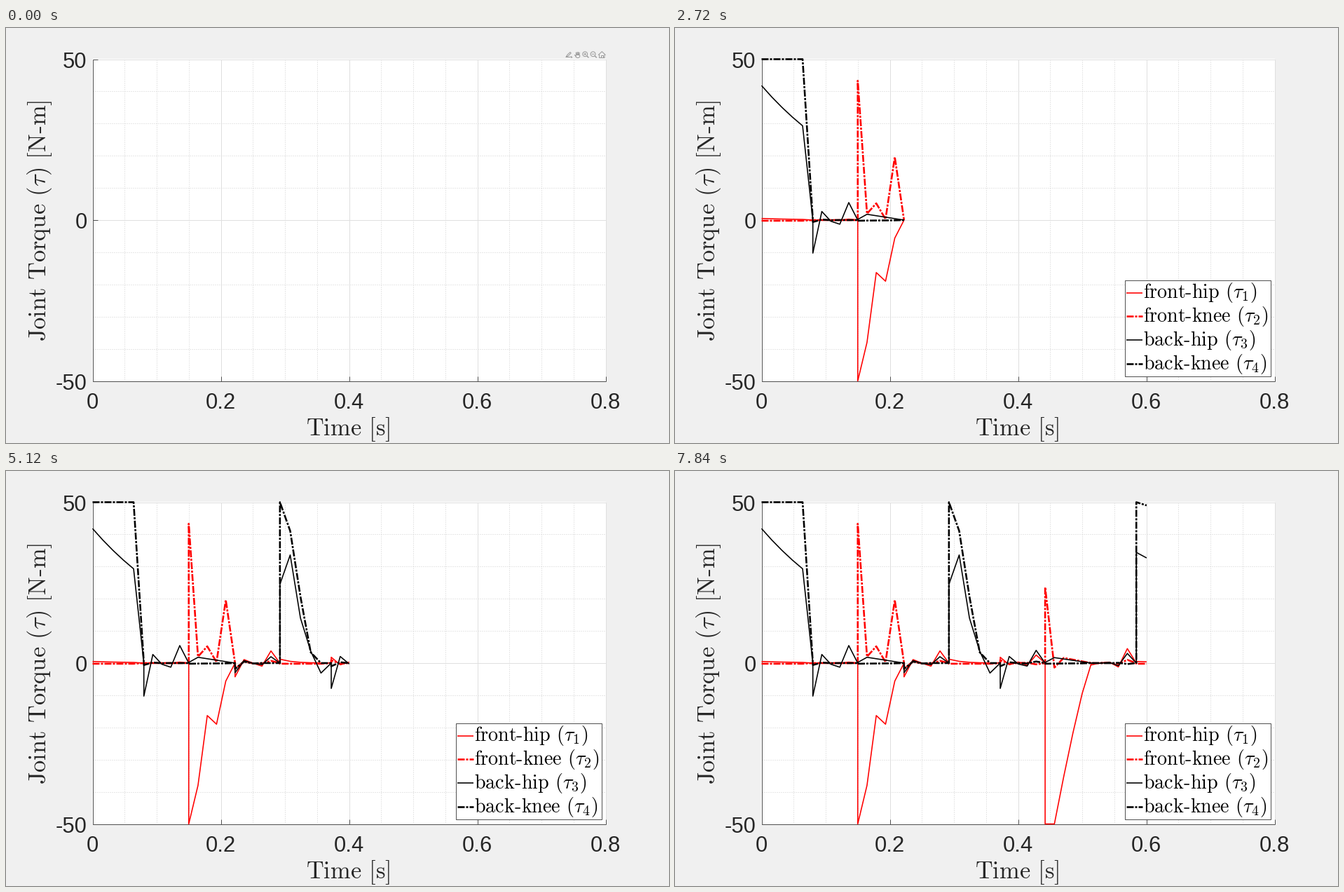
Animation of 946x592 px, one loop 8 s. Source, as a matplotlib script:

```python
import numpy as np
import matplotlib.pyplot as plt
from matplotlib.animation import FuncAnimation
from matplotlib.patches import Circle, Ellipse, Polygon, Rectangle

W, H, DPI = 946, 592, 100
PT = 72 / DPI                      # points per pixel
INK, AXIS, GREY = "#262626", "#505050", "#9a9a9a"
RED, BLACK = "#ff0000", "#000000"
DASH_DOT = (10, 2, 3, 2)           # pixels
FRAMES = 50

plt.rcParams.update({"mathtext.fontset": "cm", "mathtext.default": "rm",
                     "font.family": "Liberation Sans"})

fig = plt.figure(figsize=(W / DPI, H / DPI), dpi=DPI, facecolor="#f0f0f0")
ax = fig.add_axes([0, 0, 1, 1])
ax.set_xlim(0, W)
ax.set_ylim(H, 0)
ax.axis("off")


def px(t):
    return 123.5 + 915 * np.asarray(t)


def py(torque):
    return 274 - 4.59 * np.asarray(torque)


def line(xs, ys, color, width, z, dashes=None, **kw):
    ln, = ax.plot(xs, ys, color=color, lw=width * PT, zorder=z,
                  solid_capstyle="butt", dash_capstyle="butt",
                  solid_joinstyle="round", dash_joinstyle="round", **kw)
    if dashes:
        ln.set_linestyle((0, [d / width for d in dashes]))
    return ln


def roman(x, y, parts, size, color, z=3, rotation=0):
    """Serif label; the parts are joined by drawn hyphens."""
    made = []
    up = rotation == 90
    for i, part in enumerate(parts):
        if i:
            a, b, h = 0.011 * size, 0.276 * size, 0.216 * size
            xs, ys = ([x - h] * 2, [y - a, y - b]) if up else ([x + a, x + b], [y - h] * 2)
            made.append(line(xs, ys, color, 0.058 * size, z, snap=False))
            x, y = (x, y - size / 3) if up else (x + size / 3, y)
        body = part.replace(" ", r"\hspace{0.38}")
        txt = ax.text(x, y, f"${body}$", size=size * PT, color=color, zorder=z,
                      rotation=rotation, rotation_mode="anchor",
                      ha="left", va="baseline")
        made.append(txt)
        box = txt.get_window_extent()
        if up:
            y -= box.height - 0.7
        else:
            x += box.width - 0.7
    return made


# plot area, grid, axes and ticks
ax.add_patch(Rectangle((123, 44), 733, 460, fc="white", ec="none", zorder=0))
left, right, top, bottom = px(0), px(0.8), py(50), py(-50)
for i in range(17):
    style = ("#d0d0d0", 1, 0.4, (1, 2)) if i % 4 else ("#dfdfdf", 1, 0.5)
    line([px(i * 0.05)] * 2, [top, bottom], *style)
for v in range(-50, 60, 10):
    style = ("#d0d0d0", 1, 0.4, (1, 2)) if v % 50 else ("#dfdfdf", 1, 0.5)
    line([left, right], [py(v)] * 2, *style)
line([left, left], [top, bottom + 0.5], AXIS, 1, 0.8)
line([left, right + 0.5], [bottom, bottom], AXIS, 1, 0.8)
for i in range(5):
    x = px(i * 0.2)
    line([x, x], [bottom, bottom - 7], AXIS, 1, 0.8)
    ax.text(x, 543, f"{i * 0.2:.1f}" if i else "0", size=31 * PT, color=INK,
            ha="center", va="baseline")
for v in (-50, 0, 50):
    line([left, left + 7], [py(v)] * 2, AXIS, 1, 0.8)
    ax.text(115.5, py(v) + 12.3, str(v), size=31 * PT, color=INK,
            ha="right", va="baseline")

roman(428.3, 580.5, ["Time [s]"], 34.4, INK)
roman(56.5, 447, [r"Joint Torque (\tau) [N", "m]"], 34.4, INK, rotation=90)

# Each gait phase has six samples and ends near zero torque.
step = np.arange(6)


def flight(kick, swing):
    """Ringing after lift-off plus a swing pulse before touch-down."""
    r = -0.27
    return np.where(step < 5, kick * r ** step + swing * r ** np.abs(4.0 - step), 0)


def fade(start, ratio):
    return np.where(step < 5, start * ratio ** step, 0)


def keys(*values):
    """Values at successive steps, then a straight run to zero."""
    n = len(values)
    return np.interp(step, [*range(n), 5], [*values, 0])


def push(peak, span):
    """Half-cosine release from the peak."""
    return peak / 2 * (1 + np.cos(np.pi * np.minimum(step / span, 1)))


def brake(limit):
    return np.maximum(limit, limit * ((5 - step) / 4) ** 1.2)


# phases: back stance, flight, front stance, flight, repeated
front_hip = [fade(0.5, 0.8), flight(0, 0.3), keys(-50, -38, -16.3, -19, -5.6),
             flight(-4.3, 3.8), fade(1.2, 0.45), flight(1.8, 2.5),
             brake(-50), flight(-0.6, 4.5), fade(0.5, 0.8)]
front_knee = [fade(-0.2, 1), flight(0, 0), keys(43.3, 2, 5.2, 0.3, 19.6),
              flight(-1.8, 0.7), fade(-0.2, 1), flight(0.9, -0.4),
              keys(23.6, -1.4, 1.6), flight(0, 1), fade(-0.2, 1)]
back_hip = [fade(41.8, 0.915), flight(-10.3, 5.5), keys(0.2, 1.8),
            flight(-3, 2), keys(24.5, 33.6, 14, 3.7, -3.1),
            flight(-7.9, 4), keys(0.2, 1.7), flight(0, 3), fade(34.4, 0.95)]
back_knee = [fade(50, 1), flight(-0.6, 0), fade(-0.2, 0.8),
             flight(-1.8, 0), push(50, 3.6), flight(-1, 0.5),
             fade(-0.2, 0.8), flight(0, -0.3), fade(50, 0.98)]

spans = np.resize([0.08, 0.07, 0.0722, 0.07], len(back_hip))
starts = np.cumsum(spans) - spans
times = (starts[:, None] + spans[:, None] * step / 5).ravel()

SERIES = [
    (front_hip, RED, 1.6, None, "front", r"hip (\tau_1)"),
    (front_knee, RED, 2.6, DASH_DOT, "front", r"knee (\tau_2)"),
    (back_hip, BLACK, 1.6, None, "back", r"hip (\tau_3)"),
    (back_knee, BLACK, 2.6, DASH_DOT, "back", r"knee (\tau_4)"),
]

# legend and curves
legend = [ax.add_patch(Rectangle((641.5, 359.5), 208, 137, fc="white", ec=INK,
                                 lw=0.8 * PT, zorder=5))]
curves = []
for i, (phases, color, width, dashes, leg, joint) in enumerate(SERIES):
    ln = line([], [], color, width, 2 + i / 10, dashes, snap=False)
    curves.append((ln, px(times), py(np.concatenate(phases))))
    y = 377.5 + 33.9 * i
    legend.append(line([644, 667], [y, y], color, width, 6, dashes))
    legend += roman(668.3, y + 7.8, [leg, joint], 28.1, BLACK, 6)

# small toolbar above the plot
tools = []


def stroke(*pts, width=1):
    tools.append(line(*zip(*pts), GREY, width, 4, snap=False))


def shape(patch, fill="none"):
    patch.set(fc=fill, ec=GREY, lw=PT, zorder=4)
    tools.append(ax.add_patch(patch))


# brush
stroke((799, 41.5), (801, 38.2), (805, 34.5), (806.2, 35.8), (802.5, 39.6),
       (799, 41.5), (805, 41.5))
shape(Polygon([(806, 40.5), (808, 42), (806, 42)]), GREY)
# hand
shape(Ellipse((815.8, 40), 6, 5))
for dx in (-2.4, -0.8, 0.8, 2.4):
    stroke((815.8 + dx * 0.8, 39), (815.8 + dx, 33.8 + abs(dx) * 0.4), width=1.2)
stroke((813.5, 40.5), (811.2, 38.2), width=1.2)
# zoom in and out
for cx in (826.2, 837.6):
    shape(Circle((cx, 37.2), 3.4))
    stroke((cx + 2.4, 39.6), (cx + 5.2, 42.4), width=1.4)
    stroke((cx - 1.8, 37.2), (cx + 1.8, 37.2))
stroke((826.2, 35.4), (826.2, 39))
# home
stroke((845, 38.6), (850.3, 33.6), (855.5, 38.6))
stroke((846.6, 37.6), (846.6, 42.5), (854, 42.5), (854, 37.6))
shape(Rectangle((849, 39.3), 2.6, 3.2))


def update(n):
    for ln, xs, ys in curves:
        ln.set_data(xs[:n + 1], ys[:n + 1])
    for part in legend:
        part.set_visible(n > 0)
    for part in tools:
        part.set_visible(n == 0)
    return [c[0] for c in curves] + legend + tools


anim = FuncAnimation(fig, update, frames=FRAMES, interval=160,
                     repeat=True, repeat_delay=0, blit=False)
plt.show()
```
